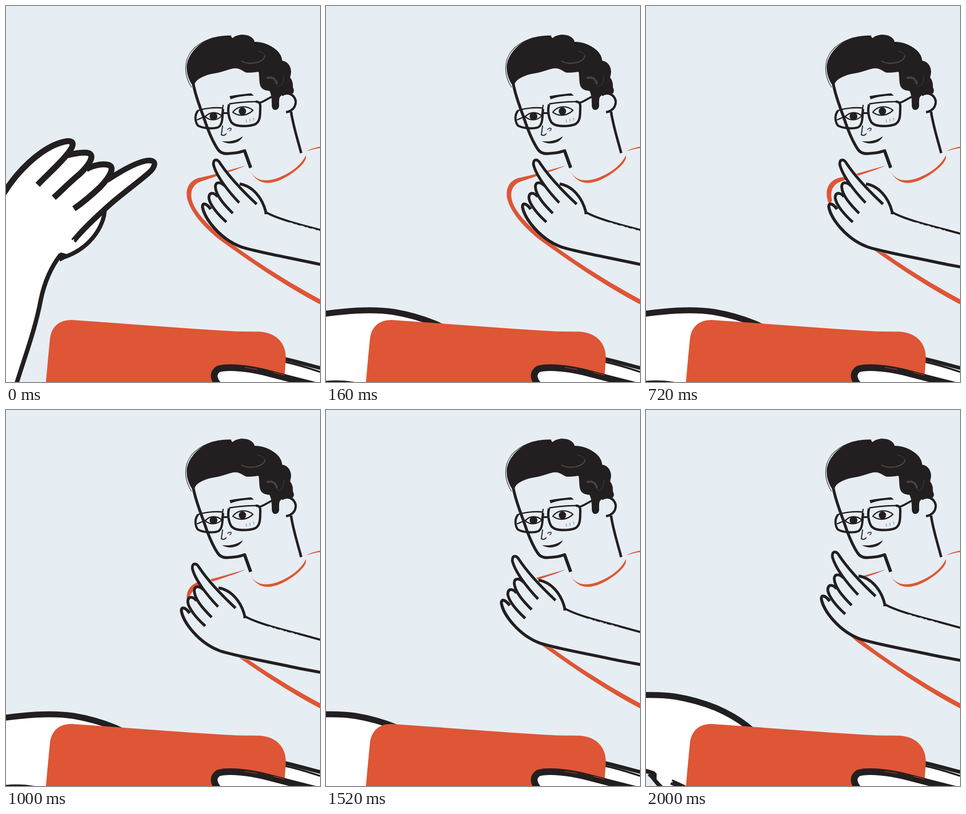
Animation, 684 px wide and 818 px high, one loop 2.08 s. Source, as an HTML page:

```html
<!DOCTYPE html>
<html lang="en">
<head>
<meta charset="utf-8">
<title>Hand game</title>
<style>
  html, body { margin: 0; width: 100%; height: 100%; overflow: hidden; background: #e6edf3; }
  svg { display: block; width: 100%; height: 100%; }
  .ink { fill: #231f20; }
  .red { fill: #de5635; }
  .skin { fill: #e6edf3; }
  .white { fill: #fff; }
  .line { fill: none; stroke: #231f20; stroke-linejoin: round; }
  .shine { fill: none; stroke: #48464a; }
  .dry { fill: none; stroke: #fff; }
</style>
</head>
<body>
<svg viewBox="0 0 684 818">
  <g id="head">
    <path class="ink" stroke="#231f20" stroke-width="2" stroke-linejoin="round" d="M408 174 C398 160 393 144 395 127 C399 106 416 86 438 75 C455 68 474 65 489 66 L493 71 L499 67 C510 62 524 62 533 68 C538 71 540 75 541 79 C558 78 576 86 588 96 C596 103 600 111 601 120 C612 121 620 131 620 143 C620 149 618 152 618 156 C624 163 624 170 624 177 C628 184 626 190 621 191 C611 188 600 190 595 199 C593 206 594 212 594 218 C592 227 581 228 580 218 C580 207 580 194 575 184 C562 183 556 179 554 170 C552 160 553 150 551 142 C541 143 530 146 521 143 C511 137 505 133 494 135 C480 138 469 144 452 146 C434 149 416 157 411 167Z"/>
    <g class="line">
      <path stroke-width="1.2" d="M404 177 C387 150 387 120 404 98 C424 75 455 64 491 65"/>
      <path stroke-width="6.2" d="M408 170 C412 190 420 214 430 240 C439 268 449 293 461 311 C466 319 473 322 484 321 C499 320 510 319 521 314"/>
      <path stroke-width="7" d="M519 313 L533 352"/>
      <path stroke-width="5.5" d="M621 230 C625 259 636 293 643 320"/>
      <path stroke-width="5" d="M601 194 C612 186 627 191 631 206 C632 220 623 229 610 231"/>
      <path stroke-width="4.5" d="M552 211 C562 208 569 202 580 197"/>
      <path stroke-width="5.2" d="M486 214 C482 226 485 244 491 253 C500 264 528 262 541 258 C556 252 553 233 554 219 C554 211 551 208 544 208"/>
      <path stroke-width="3" d="M486 213 C498 211 522 208 546 208"/>
      <path stroke-width="4.8" d="M418 228 C411 237 411 251 418 260 C428 266 450 268 462 264 C473 258 471 239 473 224"/>
      <path stroke-width="3" d="M417 228 C430 223 452 220 472 222"/>
      <path stroke-width="4" d="M470 233 L485 233"/>
      <path stroke-width="2.6" d="M473 215 L470 236"/>
      <path stroke-width="2.6" d="M494 231 C506 216 525 216 538 227 C523 241 506 240 494 231Z M434 241 C444 229 460 230 470 239 C460 250 444 250 434 241Z M416 248 L436 239"/>
      <path stroke-width="2.2" d="M472 260 L469 280 C474 283 478 281 480 277"/>
      <path stroke-width="1.6" d="M482 269 C490 262 494 268 487 272"/>
    </g>
    <ellipse class="ink" cx="515" cy="229" rx="8" ry="8.5"/>
    <ellipse class="ink" cx="452" cy="240" rx="8.5" ry="8"/>
    <path class="ink" d="M487 196 C505 193 520 191 534 190 L540 195 C520 195 505 197 489 203Z"/>
    <path class="ink" d="M470 294 C486 296 503 293 516 283 C510 298 488 304 470 294Z"/>
    <path fill="none" stroke="#a9adb1" stroke-width="2" d="M523 247 L524 254 M531 245 L532 252 M539 243 L540 249"/>
    <path class="shine" stroke-width="2.5" d="M513 120 C530 129 562 124 564 108"/>
    <path class="shine" d="M564 108 C562 102 556 99 548 98 M589 168 C594 183 606 172 605 151"/>
    <path class="shine" stroke-width="4" d="M568 157 C580 153 588 158 590 170"/>
  </g>

  <g class="red">
    <path d="M533 360 C545 381 565 383 590 375 C620 364 643 346 653 325 C657 335 640 353 620 366 C588 387 553 397 533 360Z"/>
    <path d="M654 316 C665 310 675 308 684 306 V309 C675 310 665 313 654 316Z"/>
    <path d="M523 347 C485 357 455 367 420 374 C398 380 390 400 395 420 C402 448 430 482 470 512 C530 555 600 605 684 649 V638 C610 598 540 553 490 516 C445 483 412 450 405 422 C400 402 408 388 424 382 C455 371 490 361 523 347Z"/>
  </g>

  <g id="far">
    <path class="skin" d="M430 432 L442 410 L456 390 L472 385 L452 345 C451 332 461 332 467 343 L510 388 C540 394 560 420 567 450 C620 470 680 487 760 507 V577 C660 558 560 545 520 529 C470 508 436 462 428 440Z"/>
    <g class="line" stroke-width="6">
      <path d="M508 428 C485 404 458 370 452 345 C451 332 461 332 467 343 C485 370 515 402 546 431"/>
      <path d="M494 451 C475 432 457 412 456 393 C457 381 468 383 477 392"/>
      <path d="M480 470 C460 452 444 432 442 418 C442 404 453 405 461 415"/>
      <path stroke-width="6.5" d="M446 442 C439 432 428 425 428 437 C432 462 466 507 512 524 C540 534 620 548 684 562 L760 576"/>
      <path d="M509 387 C536 391 558 416 566 448 L566 453"/>
      <path stroke-width="4.6" d="M565 448 C590 463 645 477 684 487 L760 508"/>
    </g>
    <path fill="none" stroke="#e6edf3" stroke-width="1" stroke-dasharray="8 5 3 9" d="M618 471 L684 489"/>
  </g>

  <g id="near">
    <path class="white" d="M-75 640 C-62 545 -48 490 -28 448 C-14 420 0 397 22 370 C58 328 98 299 134 294 C152 293 146 308 132 324 L180 320 C194 325 182 345 175 352 L224 346 C238 351 232 362 222 374 L313 336 C330 337 324 352 310 364 C282 388 247 413 224 434 L215 447 C213 480 180 530 118 549 C95 575 78 610 70 660 C60 710 42 760 5 880 H-80Z"/>
    <g class="line" stroke-width="13">
      <path d="M-75 640 C-62 545 -48 490 -28 448 C-14 420 0 397 22 370 C58 328 98 299 134 294 C152 293 146 308 132 324 C120 340 90 367 69 389"/>
      <path d="M132 325 C148 321 168 317 180 320 C194 325 182 345 160 366 C140 382 121 402 104 417"/>
      <path d="M175 355 C191 346 212 342 224 346 C238 351 226 372 205 394 C188 410 167 428 148 441"/>
      <path stroke-width="12" d="M220 379 C249 360 290 336 313 336 C330 337 324 352 310 364 C282 388 247 413 224 434 C196 459 168 485 147 511"/>
      <path stroke-width="9" d="M215 444 C214 475 186 530 118 549"/>
      <path stroke-width="9.5" d="M119 541 C98 568 84 600 76 638 C64 702 43 757 24 818 L5 880"/>
    </g>
    <path class="ink" d="M113 541 L120 536 L136 541 L134 547 L118 556Z"/>
    <path class="dry" stroke-width="2.5" d="M142 517 L148 508 M133 531 L139 527"/>
  </g>

  <path class="white" d="M600 768 L684 790 V822 L600 803Z"/>
  <path class="line" stroke-width="8" d="M600 766 C630 773 655 780 690 789"/>
  <path class="line" stroke-width="4" d="M606 774 C635 780 660 788 690 798"/>
  <path class="red" d="M87 818 C90 785 93 750 96 722 C100 697 116 683 143 683 C262 691 380 701 505 708 L553 708.5 C590 711 610 735 609.5 765 C609 780 607 800 606 818Z"/>
  <path class="white" d="M468 830 C452 814 448 800 462 790 C485 783 530 789 560 796 C600 806 640 817 690 829Z"/>
  <path class="line" stroke-width="14.5" d="M468 830 C452 814 448 800 462 790 C485 783 530 789 560 796 C600 806 640 817 690 829"/>
  <path fill="none" stroke="#de5635" stroke-width=".9" d="M520 786 L548 791 M582 797 L606 803"/>
</svg>
<script>
  const LOOP = 2080, TICK = 40;
  const near = document.getElementById('near');
  const far = document.getElementById('far');

  // Eased progress from 0 to 1 between two times
  function ease(time, from, to) {
    const p = Math.min(1, Math.max(0, (time - from) / (to - from)));
    return p * p * (3 - 2 * p);
  }

  function pose(time) {
    const swing = ease(time, 0, 160);
    const x = 237 - 88 * swing - 83 * ease(time, 1000, 1200);
    const y = 527 + 415 * swing - 42 * ease(time, 1800, 2000);
    near.setAttribute('transform', `translate(${x} ${y}) rotate(${73 * swing}) translate(-237 -527)`);

    const farX = -46 * ease(time, 600, 800);
    const farY = -26 * ease(time, 1400, 1600);
    far.setAttribute('transform', `translate(${farX} ${farY})`);
  }

  const start = performance.now();
  function frame() {
    const time = (performance.now() - start) % LOOP;
    pose(Math.floor(time / TICK) * TICK);
    requestAnimationFrame(frame);
  }
  frame();
</script>
</body>
</html>
```
